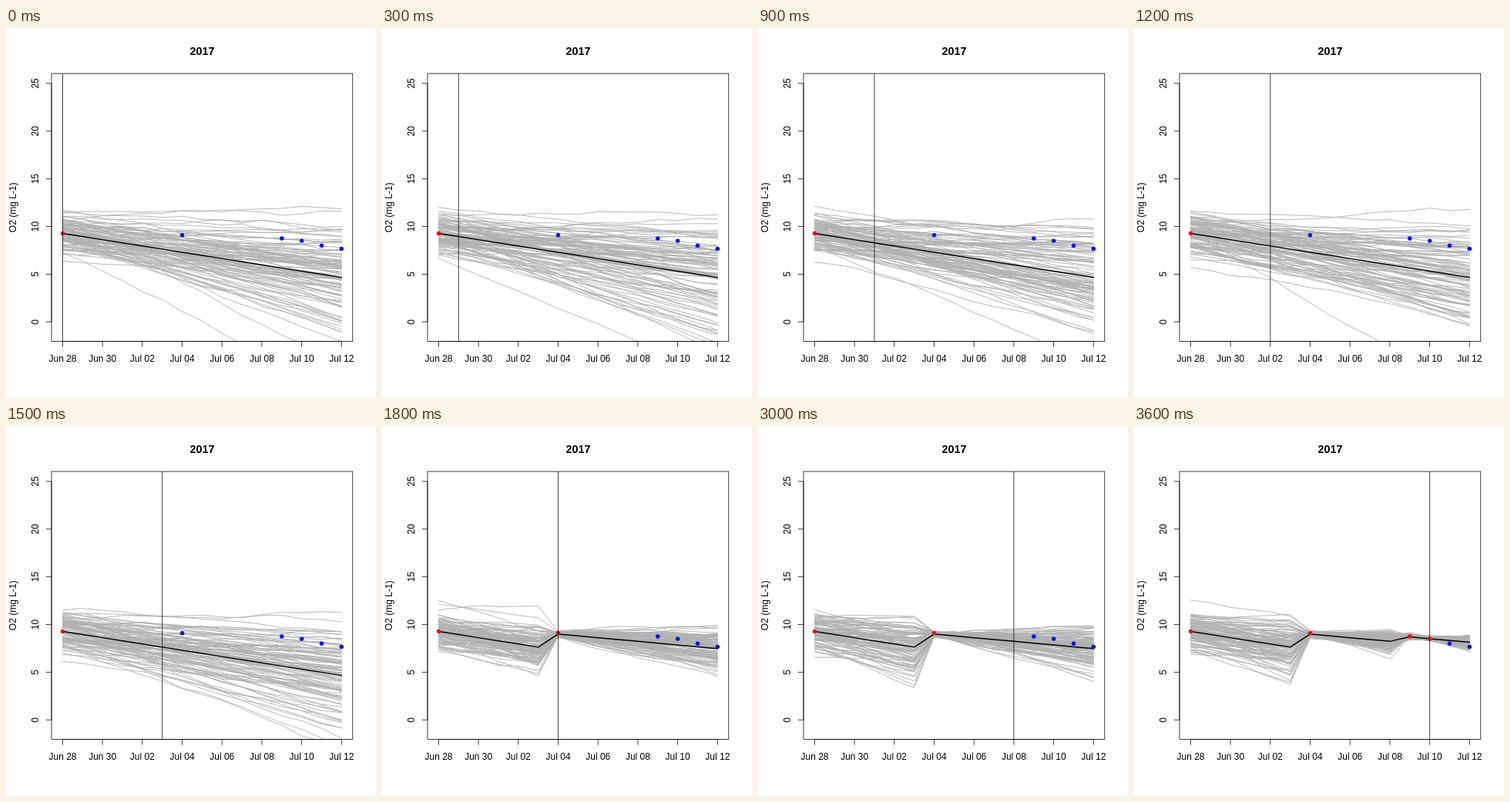
These frames come from a looping animation (480 px wide and 480 px high, 3900 ms). An HTML page:

```html
<!DOCTYPE html>
<html lang="en">
<head>
<meta charset="utf-8">
<title>Oxygen forecast</title>
<style>
  html, body { margin: 0; width: 100%; height: 100%; overflow: hidden; background: #fff; }
  svg { display: block; width: 480px; height: 480px; }
  text { font: 12px "Liberation Sans", Arial, sans-serif; text-anchor: middle; }
  .title { font-size: 14.4px; font-weight: bold; }
  .rule { fill: none; stroke: #000; stroke-width: 0.75; }
  polyline { fill: none; stroke-linejoin: round; stroke-linecap: round; }
  #members { stroke: #b0b0b0; stroke-width: 0.9; }
  #mean { stroke: #000; stroke-width: 1.5; }
</style>
</head>
<body>
<svg viewBox="0 0 480 480">
  <clipPath id="area"><rect x="59.04" y="59.04" width="390.72" height="347.52"/></clipPath>
  <g clip-path="url(#area)">
    <g id="members"></g>
    <polyline id="mean"/>
    <g id="dots"></g>
    <path id="today" class="rule"/>
  </g>
  <rect class="rule" x="59.04" y="59.04" width="390.72" height="347.52"/>
  <path id="axes" class="rule"/>
  <g id="labels"></g>
  <text class="title" x="254.4" y="34.7">2017</text>
  <text transform="translate(12.96 232.8) rotate(-90)">O2 (mg L-1)</text>
</svg>
<script>
const STEP = 300, STEPS = 13, DAYS = 14, COUNT = 100;
const LEFT = 59.04, BOTTOM = 406.56, TICK = 7.2;
const observed = [[0, 9.28], [6, 9.1], [11, 8.75], [12, 8.5], [13, 8], [14, 7.67]];

const $ = id => document.getElementById(id);
const px = day => 73.51 + day * 25.842;
const py = v => 381.3 - v * 12.376;

function add(parent, tag, attrs, text) {
  const el = document.createElementNS("http://www.w3.org/2000/svg", tag);
  for (const k in attrs) el.setAttribute(k, attrs[k]);
  if (text) el.textContent = text;
  return parent.appendChild(el);
}

function drawAxes() {
  let d = `M${px(0)} ${BOTTOM}H${px(DAYS)}M${LEFT} ${py(0)}V${py(25)}`;
  for (let day = 0; day <= DAYS; day += 2) {
    const name = day < 3 ? "Jun " + (28 + day) : "Jul " + String(day - 2).padStart(2, "0");
    d += `M${px(day)} ${BOTTOM}v${TICK}`;
    add($("labels"), "text", { x: px(day), y: 432.5 }, name);
  }
  for (let v = 0; v <= 25; v += 5) {
    d += `M${LEFT} ${py(v)}h${-TICK}`;
    add($("labels"), "text", { transform: `translate(41.76 ${py(v)}) rotate(-90)` }, String(v));
  }
  $("axes").setAttribute("d", d);
}

function gaussian(seed) {
  const rand = () => {
    seed = (seed + 0x6D2B79F5) | 0;
    let t = Math.imul(seed ^ (seed >>> 15), 1 | seed);
    t = (t + Math.imul(t ^ (t >>> 7), 61 | t)) ^ t;
    return ((t ^ (t >>> 14)) >>> 0) / 4294967296;
  };
  return () => Math.sqrt(-2 * Math.log(1 - rand())) * Math.cos(2 * Math.PI * rand());
}

const average = list => list.reduce((a, b) => a + b, 0) / list.length;

// Ensemble forecast: each member drifts at its own rate, and every
// observation up to the current day pulls all members close to it.
function simulate(step) {
  const g = gaussian(step * 977 + 41);
  const spread = (sd, skew = 0) => {
    const list = Array.from({ length: COUNT }, () => {
      const z = g();
      return z - skew * (z * z - 1);
    });
    const mid = average(list);
    return list.map(z => (z - mid) * sd);
  };
  const known = new Map(observed.filter(([day]) => day <= step));
  const history = [];
  let values, rates;
  for (let day = 0; day <= DAYS; day++) {
    const target = known.get(day);
    if (day === 0) {
      values = spread(1.1).map(e => target + e);
      rates = spread(0.22, 0.12).map(e => e - 0.33);
    } else if (target) {
      const noise = spread(0.13);
      values = values.map((v, i) => target + 0.07 * (v - target) + noise[i]);
      rates = spread(0.14, 0.12).map(e => e - 0.19);
    } else {
      const noise = spread(0.14);
      values = values.map((v, i) => v + rates[i] + noise[i]);
    }
    history.push(values);
  }
  return history;
}

const points = values =>
  values.map((v, day) => `${px(day).toFixed(2)},${py(v).toFixed(2)}`).join(" ");

const scenes = Array.from({ length: STEPS }, (_, step) => {
  const history = simulate(step);
  return {
    members: history[0].map((_, i) => points(history.map(values => values[i]))),
    mean: points(history.map(average))
  };
});

drawAxes();
const members = Array.from({ length: COUNT }, () => add($("members"), "polyline", {}));
const dots = observed.map(([day, v]) => add($("dots"), "circle", { cx: px(day), cy: py(v), r: 2.7 }));

function show(step) {
  const scene = scenes[step];
  members.forEach((el, i) => el.setAttribute("points", scene.members[i]));
  $("mean").setAttribute("points", scene.mean);
  dots.forEach((el, i) => el.setAttribute("fill", observed[i][0] <= step ? "#f00" : "#00f"));
  $("today").setAttribute("d", `M${px(step)} ${LEFT}V${BOTTOM}`);
}

const start = performance.now();
let shown = -1;
function tick() {
  const step = Math.floor((performance.now() - start) / STEP) % STEPS;
  if (step !== shown) show(shown = step);
  requestAnimationFrame(tick);
}
tick();
</script>
</body>
</html>
```
